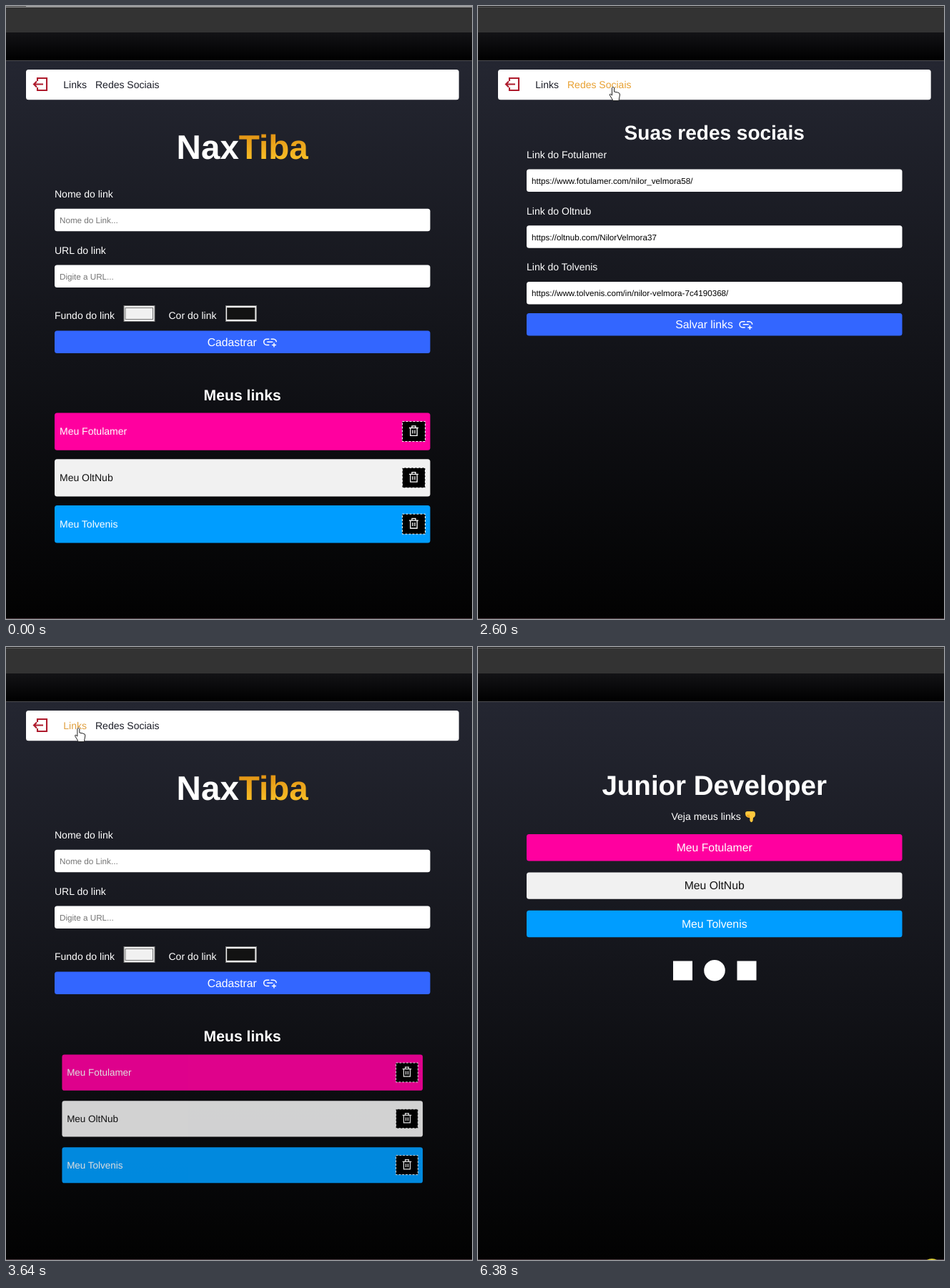
Write an HTML page that moves like this. It is 652 px wide and 858 px high and loops after 6.45 s.

```html
<!DOCTYPE html>
<html lang="pt-BR">
<head>
<meta charset="utf-8">
<title>Meus links</title>
<style>
  html, body { margin: 0; width: 100%; height: 100%; overflow: hidden; background: #000; }
  svg { display: block; }
  text { font-family: "Liberation Sans", Arial, sans-serif; text-rendering: geometricPrecision; }
  .line { fill: none; stroke: #fff; stroke-width: 1.5; }
</style>
</head>
<body>
<svg id="stage" width="652" height="858" viewBox="0 0 652 858"></svg>
<script>
const LOOP = 6450;
const SOCIAL_AT = 2240, SOCIAL_DATA_AT = 2400, LINKS_AT = 3450, PROFILE_AT = 4560, PROFILE_DATA_AT = 4680;
const CENTER = 330.7;

const items = [
  { label: 'Fotulamer', fill: '#ff009f', ink: '#fff' },
  { label: 'OltNub', fill: '#f1f1f1', ink: '#121212' },
  { label: 'Tolvenis', fill: '#009dff', ink: '#fff' },
];

const text = (x, y, size, string, fill = '#fff', extra = '') =>
  `<text x="${x}" y="${y}" font-size="${size}" fill="${fill}" ${extra}>${string}</text>`;
const centered = (y, size, string, fill = '#fff', extra = '') =>
  text(CENTER, y, size, string, fill, `text-anchor="middle" ${extra}`);
const heading = (y, size, string) => centered(y, size, string, '#fff', 'font-weight="bold"');
const box = (x, y, w, h, fill, extra = '') =>
  `<rect x="${x}" y="${y}" width="${w}" height="${h}" fill="${fill}" ${extra}/>`;
const bar = (y, h, fill) => box(68, y, 525.5, h, fill, 'rx="3.5"');

const field = (labelY, label, content) =>
  text(68, labelY, 14, label) + bar(labelY + 15.8, 31.5, '#fff') + content(labelY + 36);
const placeholder = string => y => text(75, y, 11.67, string, '#757575');

const swatch = (x, fill, edge) =>
  box(x + .5, 419.5, 43, 22, '#efefef', 'stroke="#767676"') +
  box(x + 2.5, 422.5, 38.5, 16, fill, `stroke="${edge}"`);

const submit = (y, label, textX, iconX) =>
  bar(y, 31.5, '#3366ff') + text(textX, y + 21.2, 15.75, label) +
  `<path class="line" transform="translate(${iconX} ${y + 16})"
    d="M8-4.3H4.5a4.1 4.1 0 0 0 0 8.2H8M5-.2h8M10.3-4.3H14A4.1 4.1 0 0 1 18-.2M14.7 1v6M11.7 4h6"/>`;

const trash = y =>
  box(554.5, y - 13.5, 32, 28, '#000', 'stroke="#fff" stroke-dasharray="3 2"') +
  `<path class="line" style="stroke-width:1.3" transform="translate(570.5 ${y})"
    d="M-6.5-4.5h13M-2.5-4.5v-2.7h5v2.7M-4.7-4.5V6.4h9.4V-4.5M-1.5-1.5v5M1.5-1.5v5"/>`;

const navBar =
  box(28, 89, 605.7, 42.3, '#fff', 'rx="3.5"') +
  `<path d="M44 105v-4h13v17H44v-4M52 109.5H39M43 105.5l-4 4 4 4" fill="none" stroke="#ae1a2c" stroke-width="2.1"/>` +
  text(80.3, 115, 14, 'Links', '#1a1c26', 'id="navLinks"') +
  text(125, 115, 14, 'Redes Sociais', '#1a1c26', 'id="navSocial"');

const listItem = ({ label, fill, ink }, i) => {
  const y = 595.5 + i * 64.8;
  return `<g class="item" data-y="${y}">${bar(y - 26, 52.3, fill)}` +
    `${text(75, y + 4.6, 14, 'Meu ' + label, ink)}${trash(y - .5)}</g>`;
};

const linksPage =
  centered(213.7, 47.6, 'Nax<tspan fill="url(#gold)">Tiba</tspan>', '#fff', 'font-weight="bold"') +
  field(268, 'Nome do link', placeholder('Nome do Link...')) +
  field(346.8, 'URL do link', placeholder('Digite a URL...')) +
  text(68, 438, 14, 'Fundo do link') + swatch(164.5, '#f1f1f1', '#777') +
  text(227.5, 438, 14, 'Cor do link') + swatch(307, '#121212', '#333') +
  submit(454.5, 'Cadastrar', 281.7, 360.3) +
  heading(552, 21.2, 'Meus links') +
  items.map(listItem).join('');

const socialField = (y, name, url) => field(y, 'Link do ' + name, inputY =>
  `<g class="empty">${placeholder('Digite a URL...')(inputY)}</g>` +
  `<g class="filled">${text(75, inputY, 11.67, url, '#000')}</g>`);

const socialPage =
  heading(186.5, 28, 'Suas redes sociais') +
  socialField(212.8, 'Fotulamer', 'https://www.fotulamer.com/nilor_velmora58/') +
  socialField(291.5, 'Oltnub', 'https://oltnub.com/NilorVelmora37') +
  socialField(370.3, 'Tolvenis', 'https://www.tolvenis.com/in/nilor-velmora-7c4190368/') +
  submit(430, 'Salvar links', 276.3, 365.7);

const pointingHand =
  `<path d="M374 233q0-3 3-3h8q3 0 3 4t-3 5l-.5 4.500q-2 3.500-4 0l-.3-4.500q-6 0-6.200-6z" fill="#ffc83d"/>
   <path d="M376 235.500h4M376.500 237.500h4" stroke="#d67d00" stroke-width=".8"/>`;

const profileButton = ({ label, fill, ink }, i) => {
  const y = 262 + i * 53.4;
  return `<g class="button" data-y="${y + 18.7}">${bar(y, 37.4, fill)}` +
    `${centered(y + 23.8, 15.75, 'Meu ' + label, ink)}</g>`;
};

const profilePage =
  heading(206.5, 38.5, 'Junior Developer') +
  text(270.5, 242, 14, 'Veja meus links') + pointingHand +
  `<g id="profileData">${items.map(profileButton).join('')}` +
  box(273, 439.5, 27, 27, '#fff') +
  '<circle cx="331" cy="452.700" r="14.800" fill="#fff"/>' +
  box(362.5, 439.5, 27, 27, '#fff') + '</g>';

const gradient = (id, from, to) =>
  `<linearGradient id="${id}" x2="0" y2="1"><stop stop-color="${from}"/><stop offset="1" stop-color="${to}"/></linearGradient>`;

const stage = document.getElementById('stage');
stage.innerHTML = `
  <defs>${gradient('night', '#242631', '#020202')}${gradient('tabs', '#131316', '#000')}${gradient('gold', '#dc8a10', '#ffca2c')}</defs>
  ${box(0, 76, 652, 782, 'url(#night)')}
  ${box(0, 0, 652, 37, '#333')}${box(0, 37, 652, 39, 'url(#tabs)')}${box(0, 76, 652, 1, '#4c4c50')}
  <g id="brightEdge">${box(0, 0, 652, 2, '#999')}${box(0, 0, 28, 1, '#444')}</g>
  <g id="dimEdge">${box(0, 0, 652, 1, '#202020')}${box(0, 1, 652, 1, '#5a5a5a')}</g>
  ${box(0, 857, 652, 1, '#4a3a40')}
  <g id="nav">${navBar}</g>
  <g id="links">${linksPage}</g>
  <g id="social">${socialPage}</g>
  <g id="profile">${profilePage}</g>
  <circle id="press" r="13" fill="#fff03c" opacity=".8"/>
  <g id="cursor" stroke-linejoin="round">
    <path id="arrow" d="M0 0V16l3.700-3.500 2.500 5.500 2.500-1-2.400-5.500H11.500z" fill="#fff" stroke="#111"/>
    <path id="hand" d="M-1.500 1.500Q0-1 1.500 1.500V7l5 1q3 .5 3 3l-1.500 8.500H0L-4.500 12q-.8-2 1-1.800l2 1.800z" fill="#fff" stroke="#222"/>
    <path id="beam" d="M-3-7h2l1 1 1-1h2M0-6V6M-3 7h2l1-1 1 1h2" fill="none" stroke="#111"/>
  </g>`;

const byId = id => document.getElementById(id);
const all = selector => [...stage.querySelectorAll(selector)];
const show = (element, on) => { element.style.display = on ? '' : 'none'; };
const scaleAbout = (element, s) => {
  const y = +element.dataset.y;
  element.setAttribute('transform', `translate(${CENTER} ${y}) scale(${s}) translate(${-CENTER} ${-y})`);
};

// Pointer route: time, x, y
const route = [
  [920, 566, 788], [1130, 534, 617], [1330, 440, 420], [1540, 296, 222], [1750, 215, 135],
  [1890, 191, 113], [2240, 191, 113], [2320, 189, 113], [2640, 189, 113], [2940, 120, 112],
  [3080, 101, 113], [3640, 101, 113], [3780, 150, 115], [3900, 205, 121], [3970, 255, 141],
  [4040, 317, 171], [4170, 339, 199], [5030, 339, 199], [5240, 375, 300], [5450, 450, 520],
  [5650, 523, 745], [5980, 630, 860],
];
const presses = [[2090, 2240], [3220, 3370], [6380, LOOP]];

function pointerAt(t) {
  if (t >= 5980) return [635, 869];
  const next = Math.max(1, route.findIndex(point => point[0] > t));
  const [t0, x0, y0] = route[next - 1], [t1, x1, y1] = route[next];
  const k = Math.max(0, (t - t0) / (t1 - t0));
  return [x0 + (x1 - x0) * k, y0 + (y1 - y0) * k];
}

function pointerShape(t, y) {
  if (t >= 4100 && t < 5100) return 'beam';
  const overButton = t > PROFILE_AT && y > 262 && y < 406;
  return overButton || (t > 1800 && t < 4100) ? 'hand' : 'arrow';
}

function render(t) {
  const page = t < SOCIAL_AT ? 'links' : t < LINKS_AT ? 'social' : t < PROFILE_AT ? 'links' : 'profile';
  for (const id of ['links', 'social', 'profile']) show(byId(id), id === page);
  show(byId('nav'), page !== 'profile');
  show(byId('brightEdge'), t < SOCIAL_DATA_AT);
  show(byId('dimEdge'), t >= SOCIAL_DATA_AT);
  all('.empty').forEach(element => show(element, t < SOCIAL_DATA_AT));
  all('.filled').forEach(element => show(element, t >= SOCIAL_DATA_AT));
  show(byId('profileData'), t >= PROFILE_DATA_AT);

  const u = t < LINKS_AT ? 1 : Math.min(1, (t - LINKS_AT) / 300);
  const entered = 1 - (1 - u) ** 2;
  all('.item').forEach(item => {
    scaleAbout(item, .7 + .3 * entered);
    item.setAttribute('opacity', entered);
  });

  const [x, y] = pointerAt(t);
  const visible = t >= 920 && t < 5980;
  const overNav = visible && y > 100 && y < 124;
  byId('navLinks').setAttribute('fill', overNav && x > 78 && x < 115 ? '#e0a040' : '#1a1c26');
  byId('navSocial').setAttribute('fill', overNav && x > 123 && x < 217 && t < 3000 ? '#e8a030' : '#1a1c26');
  all('.button').forEach(button =>
    scaleAbout(button, visible && Math.abs(y - button.dataset.y) < 18.7 ? 1.003 : 1));

  const shape = pointerShape(t, y);
  for (const id of ['arrow', 'hand', 'beam']) show(byId(id), id === shape);
  show(byId('cursor'), visible);
  byId('cursor').setAttribute('transform', `translate(${x} ${y})`);
  show(byId('press'), presses.some(([from, to]) => t >= from && t < to));
  byId('press').setAttribute('transform', `translate(${x} ${y})`);
}

function tick() {
  render(performance.now() % LOOP);
  requestAnimationFrame(tick);
}
tick();
</script>
</body>
</html>
```
